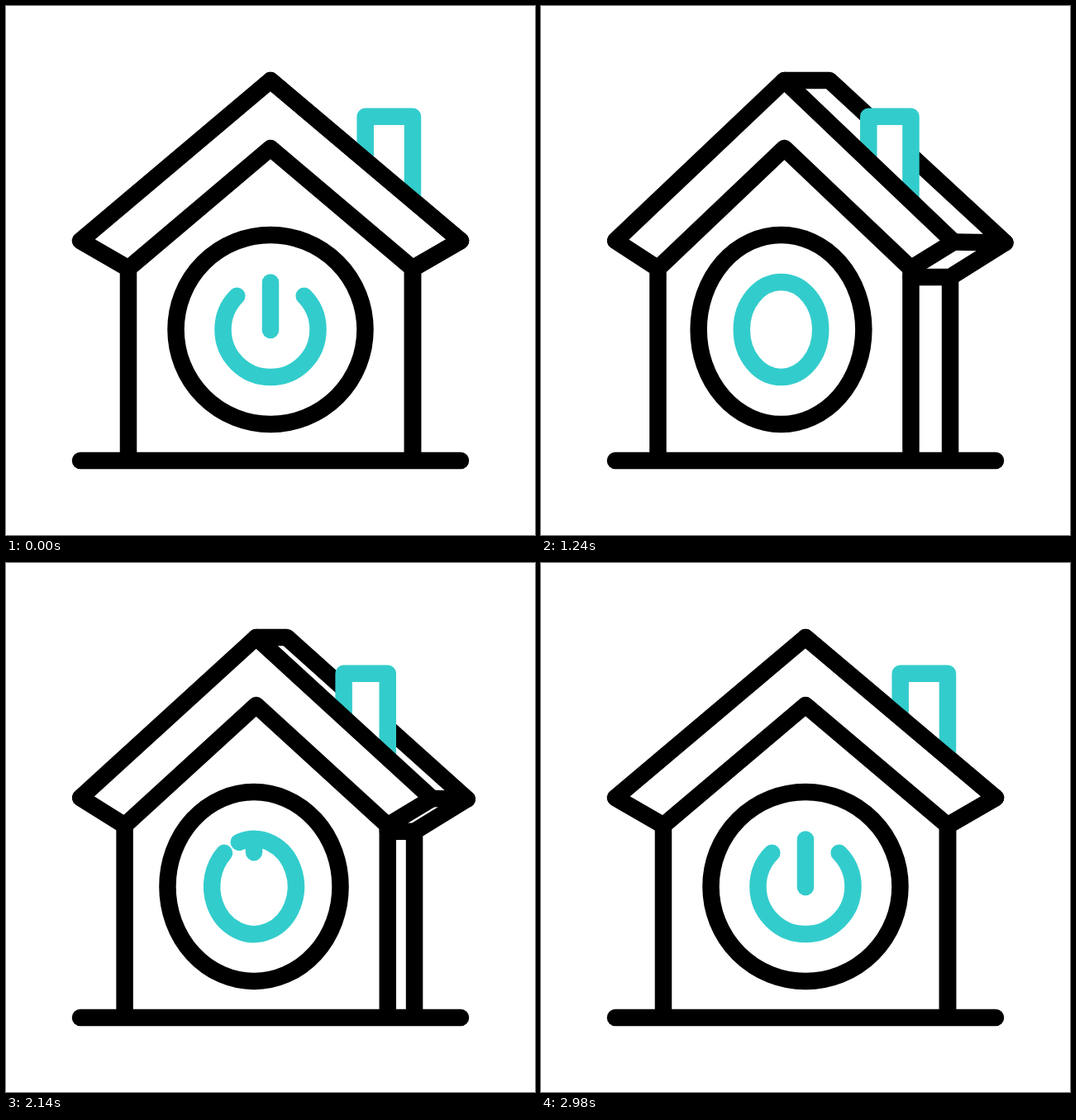
Recreate the animation shown at these times as an HTML page with a canvas. Size 640 px wide and 640 px high, loop 3.6 s.

```html
<!DOCTYPE html>
<html lang="en">
<head>
<meta charset="utf-8">
<title>Smart home</title>
<style>
html, body { margin: 0; width: 100%; height: 100%; overflow: hidden; background: #fff; }
canvas { display: block; }
</style>
</head>
<body>
<canvas id="stage" width="640" height="640"></canvas>
<script>
const ctx = document.getElementById('stage').getContext('2d');
const LOOP = 3600, TURN = 1500;
const BLACK = '#000', TEAL = '#33cccc';
const CY = 391.5, FLOOR = 550;

const clamp = x => Math.min(1, Math.max(0, x));
const smooth = x => (x = clamp(x)) * x * (3 - 2 * x);
const ramp = (t, from, to) => smooth((t - from) / (to - from));

// cubic-bezier(.53, 0, .47, 1), solved by bisection
function ease(x) {
  let lo = 0, hi = 1, s = 0.5;
  for (let i = 0; i < 30; i++) {
    s = (lo + hi) / 2;
    const r = 1 - s;
    if (1.59 * s * r * r + 1.41 * s * s * r + s * s * s < x) lo = s; else hi = s;
  }
  return smooth(s);
}

function line(points, { color = BLACK, closed = false, fill, cap = 'round' } = {}) {
  ctx.beginPath();
  points.forEach(([x, y]) => ctx.lineTo(x, y));
  if (closed) ctx.closePath();
  if (fill) {
    ctx.fillStyle = fill;
    ctx.fill();
  }
  ctx.lineCap = cap;
  ctx.strokeStyle = color;
  ctx.stroke();
}

function arc(cx, rx, ry, from, to, color) {
  ctx.beginPath();
  ctx.ellipse(cx, CY, rx, ry, 0, from * Math.PI / 180, to * Math.PI / 180);
  ctx.lineCap = 'round';
  ctx.strokeStyle = color;
  ctx.stroke();
}

function drawHouse(turn) {
  const apex = [320 - 26.7 * turn, 90];
  const innerApex = [apex[0], 172];
  const leftTip = [90, 284];
  const tip = [550 - 53 * turn, 284 + 1.5 * turn];
  const left = [148 - 6.8 * turn, 317.5];
  const right = [492 - 46.5 * turn, 317.5];
  const backApex = [320 + 30.3 * turn, 90];
  const backTip = [550 + 12 * turn, 284 + 2.5 * turn];
  const back = [492 + 3.2 * turn, 317.5 + 11 * turn];

  // side of the house
  line([apex, backApex, backTip, tip]);
  line([backTip, back, [right[0], back[1]]]);
  line([back, [back[0], FLOOR]], { cap: 'butt' });

  // chimney, standing on the front roof edge
  const roofY = x => apex[1] + (tip[1] - apex[1]) * (x - apex[0]) / (tip[0] - apex[0]);
  const x1 = 434.7 - 40.1 * turn, x2 = 492 - 46.5 * turn, top = 133.7;
  line([[x1, roofY(x1)], [x1, top], [x2, top], [x2, roofY(x2)]],
    { color: TEAL, fill: '#fff', cap: 'butt' });

  // front
  line([leftTip, apex, tip, right, innerApex, left], { closed: true });
  for (const [x, y] of [left, right]) line([[x, y], [x, FLOOR]], { cap: 'butt' });
  line([[90, FLOOR], [550, FLOOR]]);
}

function drawButton(turn, press, gapClosed, barHidden) {
  const cx = 320 - 30.8 * turn - 8.5 * press;
  arc(cx, 114.5 - 15.3 * turn - 13.2 * press, 114.5 - 9 * press, 0, 360, BLACK);

  const rx = 57.5 - 10.2 * turn - 6.9 * press;
  const ry = 57.5 - 4.3 * press;
  arc(cx, rx, ry, -45 - 90 * gapClosed, 225, TEAL);
  if (barHidden < 1) {
    const top = CY - ry + 0.5;
    line([[cx, top], [cx, top + ry * (1 - barHidden)]], { color: TEAL });
  }
}

function draw(t) {
  ctx.clearRect(0, 0, 640, 640);
  ctx.lineWidth = 20.5;
  ctx.lineJoin = 'round';
  const turn = ease(clamp(1 - Math.abs(t - TURN) / TURN));
  const press = ramp(t, 0, 500) - ramp(t, 500, 1120);
  const reopen = ramp(t, 1900, 2610);
  drawHouse(turn);
  drawButton(turn, press, ramp(t, 0, 600) - reopen, ramp(t, 0, 800) - reopen);
}

const start = performance.now();
function tick() {
  draw((performance.now() - start) % LOOP);
  requestAnimationFrame(tick);
}
tick();
</script>
</body>
</html>
```
